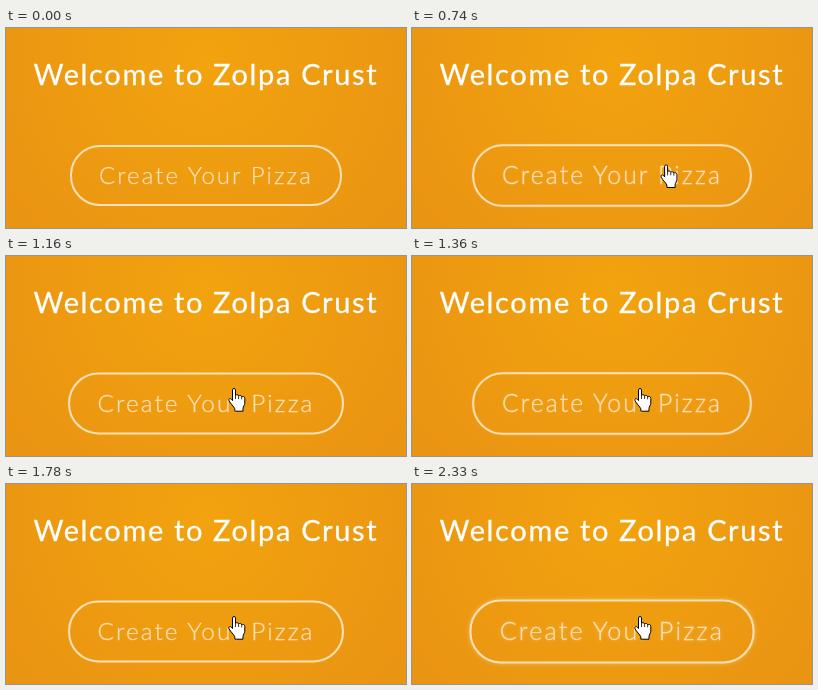
An HTML page for the animation above (2.35 s loop, 400x200 px).

```html
<!DOCTYPE html>
<html lang="en">
<head>
<meta charset="utf-8">
<title>Glowing button</title>
<style>
  html, body { margin: 0; width: 100%; height: 100%; overflow: hidden; }
  body {
    position: relative;
    background: radial-gradient(circle at 200px 36px, #f2a30e, #ea9413 240px);
    font-family: Lato, "Open Sans", sans-serif;
    color: #fff;
  }
  h1, .button {
    position: absolute;
    margin: 0;
    box-sizing: border-box;
    text-align: center;
    white-space: nowrap;
  }
  h1 {
    left: 0; top: 25px; width: 400px;
    font-size: 29px; font-weight: 400; line-height: 41px;
    letter-spacing: 1.65px;
    -webkit-text-stroke: .3px #fff;
  }
  .button {
    left: 64px; top: 117px; width: 272px; height: 61px;
    border: 2px solid #fff; border-radius: 30px;
    font-size: 24px; font-weight: 300; line-height: 56px;
    letter-spacing: 2.05px;
    -webkit-text-stroke: .25px #fff;
    opacity: .7;
  }
  .cursor { position: absolute; left: 0; top: 0; visibility: hidden; }
</style>
</head>
<body>
<h1>Welcome to Zolpa Crust</h1>
<div class="button">Create Your Pizza</div>
<svg class="cursor" width="20" height="26" viewBox="0 0 20 26">
  <path fill="#fff" stroke="#000" stroke-linejoin="round"
    d="M4.5 1.9C4.5 0 7.5 0 7.5 1.9V7.4C8.2 6.3 10.4 6.5 10.6 8C11.4 7.1 13.4 7.3 13.7 8.8C14.6 8 16.8 8.4 16.8 10.4V15.2C16.8 17.2 15 18.7 15 20.3V23.2H6.8V20.8C5.6 18.2 2.8 16 1 12.8C.2 10.8 2.2 9.9 3.4 11.2L4.5 12.6Z"/>
  <path fill="none" stroke="#000" stroke-width=".8" d="M7.5 7.4V11M10.6 8.2V11M13.7 9V11.4"/>
</svg>
<script>
  const LOOP = 2350, ENTER = 570, ARRIVE = 830, HOVER = 623, HALF = 310;
  const button = document.querySelector('.button');
  const cursor = document.querySelector('.cursor');

  const easeInOut = t => t < .5 ? 2 * t * t : 1 - 2 * (1 - t) ** 2;
  const mix = (a, b, t) => a + (b - a) * t;

  // Hover glow swings back and forth between 0 and 1.
  function pulse(time) {
    if (time < HOVER) return 0;
    const turn = (time - HOVER) / HALF % 2;
    return easeInOut(turn > 1 ? 2 - turn : turn);
  }

  function draw(time) {
    const p = pulse(time);
    const glow = `0 0 ${8 * p}px rgba(255, 255, 255, ${p})`;
    button.style.transform = `scale(${1 + p / 10})`;
    button.style.boxShadow = button.style.textShadow = glow;

    const move = easeInOut(Math.min(1, Math.max(0, (time - ENTER) / (ARRIVE - ENTER))));
    cursor.style.visibility = time < ENTER ? 'hidden' : 'visible';
    cursor.style.transform = `translate(${mix(331, 222, move)}px, ${mix(150, 132, move)}px)`;
  }

  let start;
  function tick(now) {
    start ??= now;
    draw((now - start) % LOOP);
    requestAnimationFrame(tick);
  }
  draw(0);
  requestAnimationFrame(tick);
</script>
</body>
</html>
```
